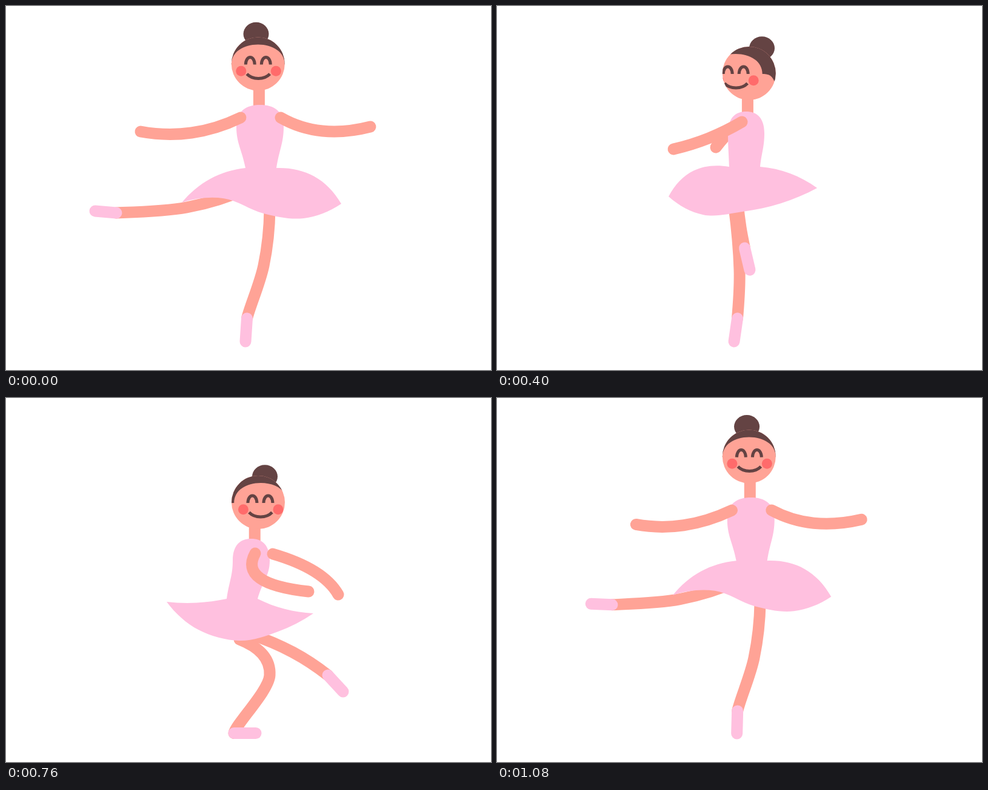
An HTML page with a canvas that plays this animation: 800x600 px, repeating every 1120 ms.

```html
<!DOCTYPE html>
<html lang="en">
<head>
<meta charset="utf-8">
<title>Pirouette</title>
<style>
  html, body { margin: 0; width: 100%; height: 100%; overflow: hidden; background: #fff; }
  canvas { display: block; width: 800px; height: 600px; }
</style>
</head>
<body>
<canvas id="stage" width="800" height="600"></canvas>
<script>
const ctx = document.getElementById('stage').getContext('2d');
const SKIN = '#ffa396', PINK = '#ffc0df', HAIR = '#644343', BLUSH = '#ff6b6b';
const LOOP = 1120, STEP = 40, LIMB = 19, WAIST = 25.5, HEAD = 44;

// Key poses.
// arms: shoulder, elbow, hand; legs: hip, knee, ankle, toe
// torso: waist x, waist y, chest x, chest half-width, neckline y
// skirt: left tip, right tip, hem middle, then the bulge of its four edges
// head: centre and bun centre
const poses = [
  { at: 0,
    armR: [387, 184, 306, 209, 222, 207], armL: [453, 184, 522, 206, 601, 199],
    legR: [400, 300, 298, 332, 182, 341, 147, 338],
    legL: [435, 335, 425, 428, 397.5, 515, 395, 553],
    torso: [420.5, 267, 419, 39, 163],
    skirt: [290, 324, 553, 326, 425, 342, 12, 18, 16, -16],
    head: [415.8, 95.5, 412.5, 46] },
  { at: 240,
    armR: [395, 195, 323, 222, 256, 263], armL: [425, 193, 460, 225, 424, 236],
    legR: [330, 315, 288, 347, 379, 401, 413, 412],
    legL: [411, 350, 414, 419, 395, 515, 391, 553],
    torso: [411.5, 269, 412.5, 38, 171],
    skirt: [286, 312, 531, 302, 425, 360, 14, 9, 21, 13],
    head: [415.8, 107, 412.5, 63] },
  { at: 400,
    armR: [395, 195, 377, 214, 361, 233], armL: [404, 191, 349, 218, 291, 236],
    legR: [397, 325, 402, 365, 408.5, 399, 417, 435],
    legL: [391, 330, 400, 435, 396.5, 515, 391, 553],
    torso: [408.5, 265, 411, 30, 174],
    skirt: [283, 314, 528, 300, 405, 339, 20, 7, 6, 18],
    head: [415.8, 111, 437, 69.5] },
  { at: 560,
    armR: [408, 195, 447, 229, 470, 259], armL: [378, 208, 374, 233, 417, 256],
    legR: [385, 318, 452, 357, 470, 424, 457, 458],
    legL: [363, 322, 402, 388, 389, 521, 412, 553],
    torso: [389, 281, 394, 30, 182],
    skirt: [267, 292, 520, 304, 400, 324, 0, 9, -1, 13],
    head: [414.5, 126, 375, 91] },
  { at: 760,
    armR: [411, 256, 419, 297, 499, 319], armL: [440, 257, 509, 286, 548, 324],
    legR: [405, 390, 473, 419, 531, 457, 556, 484],
    legL: [385, 398, 435, 457, 376, 552.5, 412, 552.5],
    torso: [389.5, 331, 404.5, 30.5, 232],
    skirt: [265, 336, 507, 355, 385, 400, -4, -5, 8, 16],
    head: [416, 172, 427, 129.5] },
  { at: 920,
    armR: [398, 212, 356, 228, 403, 243], armL: [448, 207, 527, 212, 605, 232],
    legR: [400, 310, 391, 323, 379, 336, 351, 369],
    legL: [413, 350, 399, 441, 377, 537, 412, 552.5],
    torso: [412.5, 296, 413, 38, 188],
    skirt: [290, 352, 508, 366, 411, 365, 24, 27, 20, -25],
    head: [415.8, 122, 402, 77] },
];

// The last swing eases out: after 80% of it, 96% of the way is done.
const settled = { at: 1080 };
for (const part of Object.keys(poses[0]).slice(1)) {
  settled[part] = poses[5][part].map((v, i) => v + (poses[0][part][i] - v) * 0.96);
}
poses.push(settled);

// Smooth cyclic interpolation of one body part.
function sample(part, t) {
  const n = poses.length;
  const time = i => poses[(i + n) % n].at + Math.floor(i / n) * LOOP;
  const row = i => poses[(i + n) % n][part];
  let k = n - 1;
  while (poses[k].at > t) k--;
  const span = time(k + 1) - time(k), u = (t - time(k)) / span, v = 1 - u;
  const slope = (i, c) => {
    const h0 = time(i) - time(i - 1), h1 = time(i + 1) - time(i);
    const d0 = (row(i)[c] - row(i - 1)[c]) / h0, d1 = (row(i + 1)[c] - row(i)[c]) / h1;
    return (d0 * h1 + d1 * h0) / (h0 + h1);
  };
  return row(k).map((a, c) => a * (1 + 2 * u) * v * v + row(k + 1)[c] * u * u * (3 - 2 * u)
    + span * u * v * (slope(k, c) * v - slope(k + 1, c) * u));
}

// The face slides away, vanishes at the back and returns on the other side.
function faceShift(t) {
  const dt = t - 480;
  return dt < 0 ? -100 * Math.exp(dt / 53) : 100 * Math.exp(-dt / 83);
}

const points = flat => {
  const list = [];
  for (let i = 0; i < flat.length; i += 2) list.push([flat[i], flat[i + 1]]);
  return list;
};

// Continues the path from p[0] smoothly through the other points.
function spline(p, segments = p.length - 1) {
  const beyond = (a, b, c) => a.map((v, i) => 3 * v - 3 * b[i] + c[i]);
  const n = p.length;
  const q = [beyond(p[0], p[1], p[2]), ...p, beyond(p[n - 1], p[n - 2], p[n - 3])];
  for (let i = 1; i <= segments; i++) {
    const c1 = q[i].map((v, j) => v + (q[i + 1][j] - q[i - 1][j]) / 6);
    const c2 = q[i + 1].map((v, j) => v - (q[i + 2][j] - q[i][j]) / 6);
    ctx.bezierCurveTo(...c1, ...c2, ...q[i + 1]);
  }
}

// Middle of an edge, pushed outward.
function bulge([ax, ay], [bx, by], k) {
  const dx = bx - ax, dy = by - ay, len = Math.hypot(dx, dy);
  return [(ax + bx) / 2 + dy / len * k, (ay + by) / 2 - dx / len * k];
}

function stroke(color, width, cap, draw) {
  ctx.strokeStyle = color;
  ctx.lineWidth = width;
  ctx.lineCap = cap;
  ctx.beginPath();
  draw();
  ctx.stroke();
}

function fill(color, draw) {
  ctx.fillStyle = color;
  ctx.beginPath();
  draw();
  ctx.fill();
}

function limb(p) {
  stroke(SKIN, LIMB, 'round', () => {
    ctx.moveTo(...p[0]);
    spline(p, 2);
  });
}

function leg(p) {
  limb(p);
  stroke(PINK, LIMB, 'round', () => {
    ctx.moveTo(...p[2]);
    ctx.lineTo(...p[3]);
  });
}

function drawSkirt(s, [waistX, waistY]) {
  const [left, right, hem] = points(s.slice(0, 6));
  const [topL, topR, lowR, lowL] = s.slice(6);
  const waistL = [waistX - WAIST, waistY], waistR = [waistX + WAIST, waistY];
  fill(PINK, () => {
    ctx.moveTo(...left);
    spline([left, bulge(left, waistL, topL), waistL]);
    ctx.lineTo(...waistR);
    spline([waistR, bulge(waistR, right, topR), right]);
    spline([right, bulge(right, hem, lowR), hem, bulge(hem, left, lowL), left]);
  });
}

function drawTorso([waistX, waistY, x, half, top]) {
  const chest = top + 36, rise = waistY - chest;
  const waist = side => waistX + side * WAIST, rib = side => x + side * half;
  const flare = side => waist(side) + (rib(side) - waist(side)) * 0.4;
  fill(PINK, () => {
    ctx.moveTo(waist(-1), waistY + 6);
    ctx.lineTo(waist(-1), waistY);
    ctx.bezierCurveTo(flare(-1), waistY - rise * 0.45, rib(-1), chest + rise * 0.4, rib(-1), chest);
    ctx.bezierCurveTo(rib(-1), top + 10, x - half * 0.58, top, x, top);
    ctx.bezierCurveTo(x + half * 0.58, top, rib(1), top + 10, rib(1), chest);
    ctx.bezierCurveTo(rib(1), chest + rise * 0.4, flare(1), waistY - rise * 0.45, waist(1), waistY);
    ctx.lineTo(waist(1), waistY + 6);
  });
}

// Fringe arch in the middle, a wave down to the nape on either side.
function drawHair(s) {
  fill(HAIR, () => {
    const curve = (a, b, c, d, e, f) => ctx.bezierCurveTo(a + s, b, c + s, d, e + s, f);
    ctx.moveTo(-300, -100);
    ctx.lineTo(-300, 23);
    ctx.lineTo(s - 90, 23);
    curve(-72, 23, -69, 20, -64, 13);
    curve(-60, 6, -58, 1, -44, 1);
    curve(-44, -20, -24, -32, 0, -32);
    curve(24, -32, 44, -20, 44, 1);
    curve(58, 1, 60, 6, 64, 13);
    curve(69, 20, 72, 23, 90, 23);
    ctx.lineTo(300, 23);
    ctx.lineTo(300, -100);
  });
}

function drawFace(s) {
  for (const x of [-28, 29.5]) fill(BLUSH, () => ctx.arc(x + s, 11.8, 8.5, 0, 7));
  for (const x of [s - 13, s + 13]) {
    stroke(HAIR, 5, 'butt', () => {
      ctx.moveTo(x - 7.5, 1);
      ctx.bezierCurveTo(x - 7, -15, x + 7, -15, x + 7.5, 1);
    });
  }
  stroke(HAIR, 5, 'butt', () => {
    ctx.moveTo(s - 18.5, 16.5);
    ctx.bezierCurveTo(s - 9, 26.5, s + 10, 26.5, s + 19.5, 16.5);
  });
}

function drawHead([x, y, bunX, bunY], s) {
  fill(HAIR, () => ctx.ellipse(bunX, bunY, 21, 19.2, 0, 0, 7));
  ctx.save();
  ctx.translate(x, y);
  const skull = () => ctx.arc(0, 0, HEAD, 0, 7);
  fill(SKIN, skull);
  ctx.beginPath();
  skull();
  ctx.clip();
  drawHair(s > 0 ? s * 1.23 : s);
  drawFace(s);
  ctx.restore();
}

function draw(t) {
  const torso = sample('torso', t), head = sample('head', t);
  const joints = part => points(sample(part, t));
  const armR = joints('armR'), armL = joints('armL');
  const legs = [joints('legL'), joints('legR')];
  const facingAway = t >= 480 && t < 640;
  const hideR = t >= 120 && t < 640;

  ctx.fillStyle = '#fff';
  ctx.fillRect(0, 0, 800, 600);
  if (hideR) limb(armR);
  if (facingAway) limb(armL);
  if (t >= 640) legs.reverse();
  legs.forEach(leg);
  const neckX = (head[0] + torso[2]) / 2;
  stroke(SKIN, LIMB, 'butt', () => {
    ctx.moveTo(neckX, head[1] + 30);
    ctx.lineTo(neckX, torso[4] + 10);
  });
  drawSkirt(sample('skirt', t), torso);
  drawTorso(torso);
  if (!hideR) limb(armR);
  if (!facingAway) limb(armL);
  drawHead(head, faceShift(t));
}

const start = performance.now();
function tick() {
  const t = (performance.now() - start) % LOOP;
  draw(Math.floor(t / STEP) * STEP);
  requestAnimationFrame(tick);
}
tick();
</script>
</body>
</html>
```
